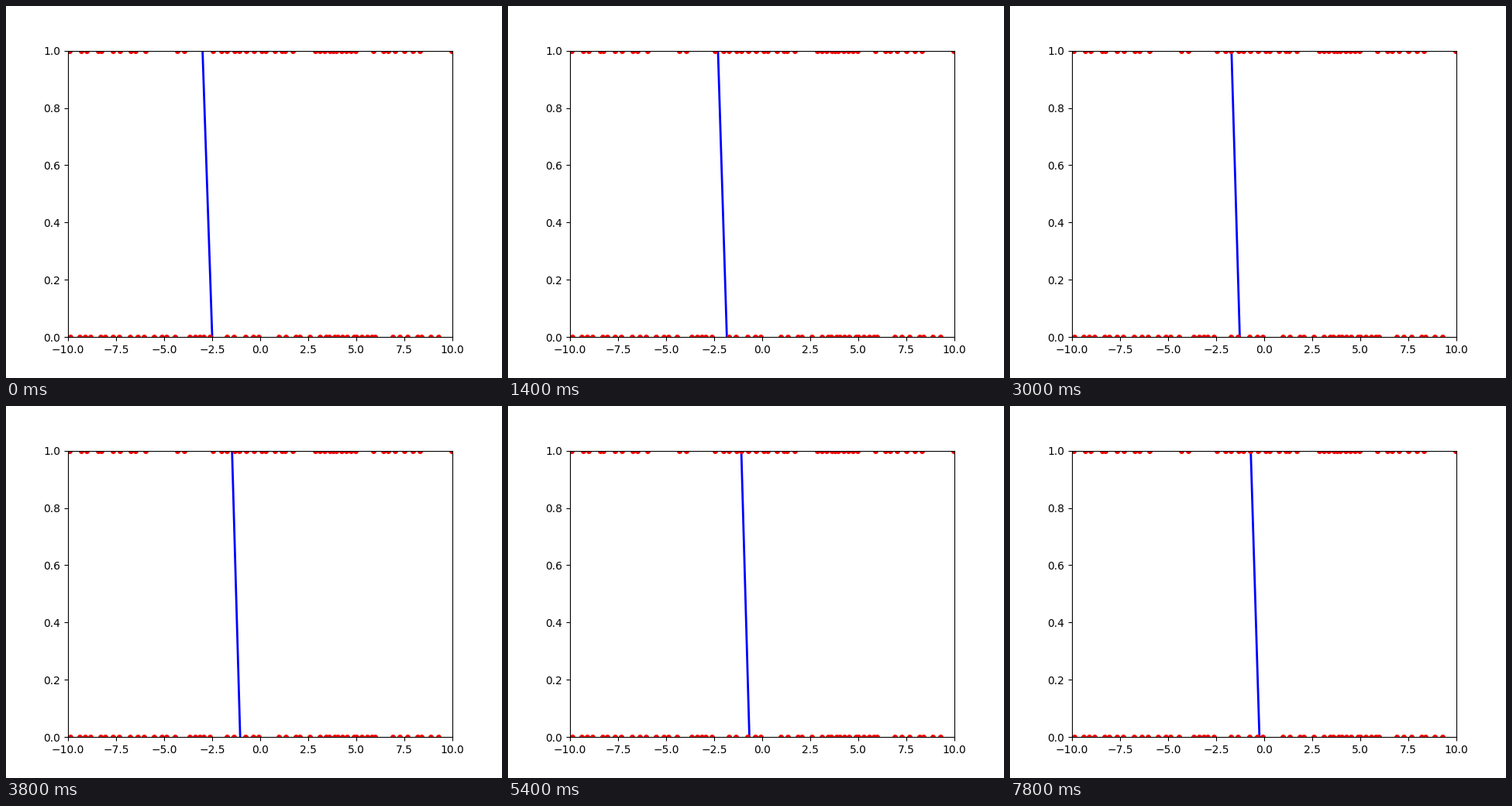
Animation, 640 px wide and 480 px high, one loop 8 s. Source, as a matplotlib script:

```python
import numpy as np
import matplotlib.pyplot as plt
from matplotlib.animation import FuncAnimation

FRAMES, STEP = 40, 200  # frame count, ms per frame

# Clusters of samples per class: first x, last x, count
UPPER = [(-9.9, -5.95, 10), (-4.3, -3.95, 2), (-2.45, 1.7, 13),
         (2.85, 4.95, 10), (5.9, 8.3, 7), (9.97, 9.97, 1)]
LOWER = [(-9.87, -7.33, 8), (-6.76, -4.42, 7), (-3.66, -2.61, 5),
         (-1.72, -0.07, 5), (0.98, 2.59, 5), (3.12, 5.98, 13),
         (6.91, 9.29, 7)]

rng = np.random.default_rng(4)


def scatter_run(first, last, count):
    """Evenly spread points whose inner members are slightly shuffled."""
    xs = np.linspace(first, last, count)
    gap = (last - first) / max(count - 1, 1)
    xs[1:-1] += rng.uniform(-0.35, 0.35, max(count - 2, 0)) * gap
    return xs


def boundary(t):
    """x of the decision line at y = 1 and y = 0 after t seconds."""
    top = -0.04 - 2.96 * np.exp(-t / 5.2)
    bottom = top + 0.42 + 0.0036 * (t - 4.8) ** 2
    return top, bottom


fig, ax = plt.subplots(figsize=(6.4, 4.8), dpi=100)
ax.set_xlim(-10, 10)
ax.set_ylim(0, 1)

line, = ax.plot([], [], color="blue", lw=2)
for runs, y in ((UPPER, 1), (LOWER, 0)):
    xs = np.concatenate([scatter_run(*run) for run in runs])
    ax.plot(xs, np.full(len(xs), y), "o", color="red", ms=4)


def update(i):
    top, bottom = boundary(i * STEP / 1000)
    ys = np.array([-1, 2])
    line.set_data(bottom + (top - bottom) * ys, ys)
    return line,


anim = FuncAnimation(fig, update, frames=FRAMES, interval=STEP,
                     repeat=True, repeat_delay=0)
plt.show()
```
